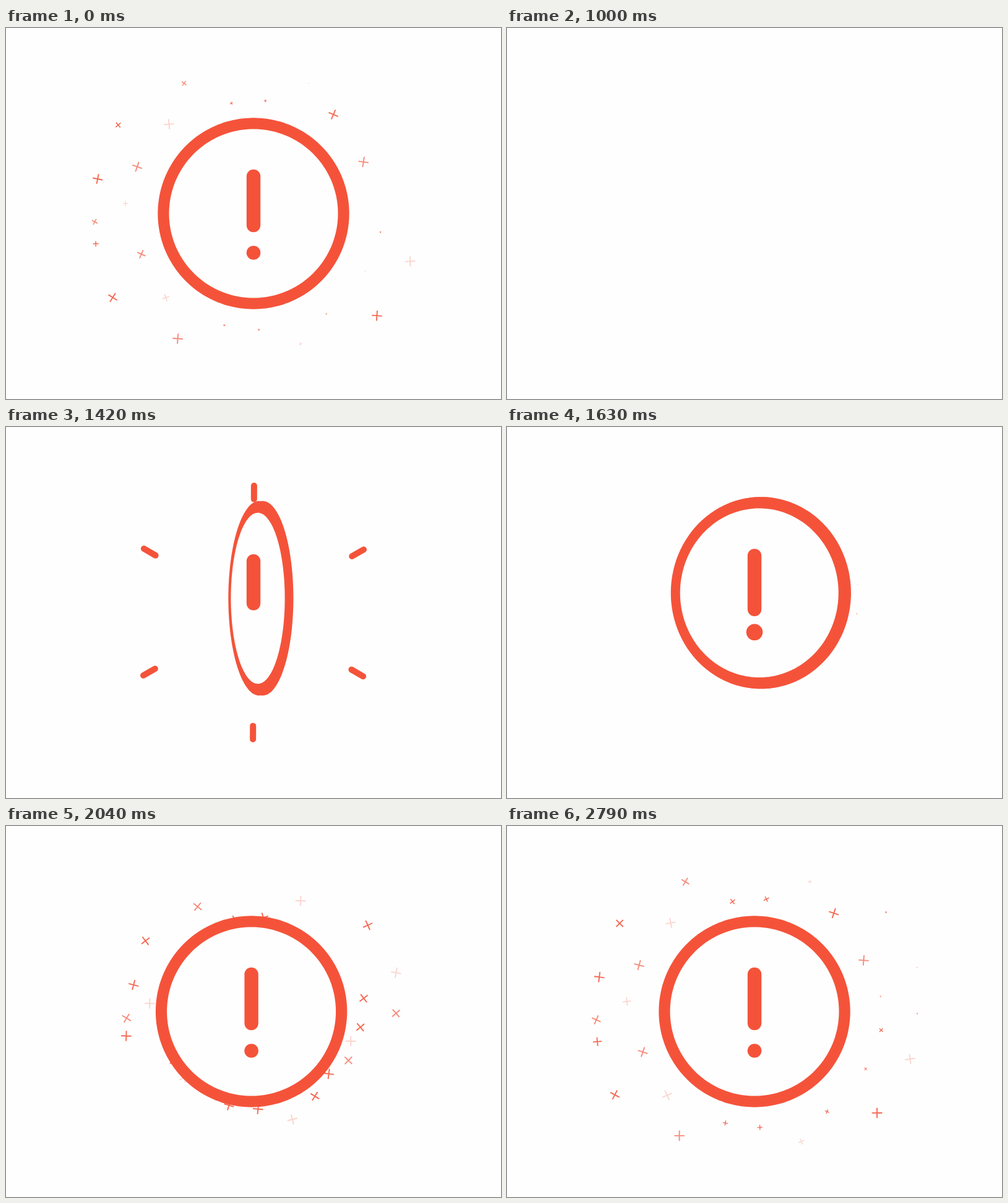
An HTML page with a canvas for the animation above (2830 ms loop, 800 by 600 pixels).

```html
<!DOCTYPE html>
<html lang="en">
<head>
<meta charset="utf-8">
<title>Alert badge</title>
<style>
  html, body { margin: 0; width: 100%; height: 100%; overflow: hidden; background: #fefefe; }
  canvas { display: block; width: 800px; height: 600px; }
</style>
</head>
<body>
<canvas id="stage" width="800" height="600"></canvas>
<script>
const ctx = document.getElementById('stage').getContext('2d');
const LOOP = 2830, RED = '#f4533a', PAPER = '#fefefe';
const CX = 400, CY = 300, RAD = Math.PI / 180;
const REST = 2790;   // time at which the crosses are at their base places
const COUNT = 29;

const clamp = v => Math.min(1, Math.max(0, v));
const part = (t, from, to) => clamp((t - from) / (to - from));
const easeInOut = p => (1 - Math.cos(Math.PI * p)) / 2;
const easeOut = (p, power) => 1 - Math.pow(1 - p, power);
const backOut = p => 1 + 3.4 * (p - 1) ** 3 + 2.4 * (p - 1) ** 2;
const rnd = n => {
  const v = Math.sin(n * 12.9898) * 43758.5453;
  return v - Math.floor(v);
};

// Crosses sit on two rings, closer together at the sides than at top and bottom
function makeCross(_, i) {
  const u = (i * 360 / COUNT - 185) * RAD;
  const a = u - 0.2 * Math.sin(2 * u);
  const pole = Math.sin(a) ** 6;
  const outer = (i % 2 === 0) !== (Math.cos(a) > 0);
  const r = 200 - 15 * pole + (outer ? 64 * (1 - 0.7 * pole) : 0) + 16 * (rnd(i) - 0.5);
  const late = i % 7 === 3 || i % 7 === 5;
  const pace = 0.05 - 0.01 * Math.cos(a) + 0.02 * rnd(i + 50) + (late ? 0.08 : 0);
  return {
    a, r, pace,
    end: Math.max(2810, 2820 + (pace - 0.045) * 4400),
    spin: 90 * rnd(i + 100),
    alpha: i % 4 === 1 ? 0.24 : i % 3 ? 0.88 : 0.68
  };
}
const crosses = Array.from({ length: COUNT }, makeCross);

// Slowing drift: 0 at rest time, 1 at 2380 ms
const decay = t => Math.exp((REST - t) / 420) - 1;

function drawCrosses(t) {
  if (t < 1625) return;
  const drift = decay(t) / decay(2380), grow = part(t, 1620, 1770);
  ctx.strokeStyle = RED;
  ctx.lineCap = 'butt';
  for (const c of crosses) {
    const size = 8.3 * grow * clamp((c.end - t) / 130);
    if (size < 0.3) continue;
    const r = c.r * (1 - c.pace * drift);
    ctx.save();
    ctx.globalAlpha = c.alpha;
    ctx.lineWidth = Math.min(1.9, 0.8 + size * 0.14);
    ctx.translate(CX + r * Math.cos(c.a), CY + r * Math.sin(c.a));
    ctx.rotate((c.spin + (t - REST) * 0.11) * RAD);
    ctx.beginPath();
    ctx.moveTo(-size, 0);
    ctx.lineTo(size, 0);
    ctx.moveTo(0, -size);
    ctx.lineTo(0, size);
    ctx.stroke();
    ctx.restore();
  }
}

function drawRays(t) {
  if (t < 1325 || t > 1562) return;
  const head = 150 + 81 * easeOut(part(t, 1320, 1510), 1.5);
  const tail = 150 + 81 * part(t, 1320, 1565);
  ctx.strokeStyle = RED;
  ctx.lineWidth = 10;
  ctx.lineCap = 'round';
  for (let i = 0; i < 6; i++) {
    const a = (i * 60 - 89.75) * RAD, c = Math.cos(a), s = Math.sin(a);
    ctx.beginPath();
    ctx.moveTo(CX + c * tail, CY + s * tail);
    ctx.lineTo(CX + c * head, CY + s * head);
    ctx.stroke();
  }
}

// Flies up from below, hangs at the top, then drops to the centre
function badgeY(t) {
  if (t < 1540) return 261 + 539 * Math.pow(part(t, 1540, 1040), 2.45);
  return 261 + 39 * easeInOut(part(t, 1540, 1860));
}

function shake(t) {
  const p = Math.max(0, t - 1880);
  return 10 * Math.exp(-p / 150) * Math.sin(p / 215 * Math.PI * 2);
}

function turn(t) {
  return 72.2 * RAD * Math.pow(Math.max(0, 1880 - t) / 460, 2.02);
}

// A disc turned about its vertical axis, seen in perspective
function disc(x, y, r, angle, color) {
  const depth = 805, n = 180, c = Math.cos(angle), s = Math.sin(angle);
  ctx.beginPath();
  for (let i = 0; i < n; i++) {
    const a = i / n * Math.PI * 2, u = r * Math.cos(a);
    const k = depth / (depth - u * s);
    ctx.lineTo(x + u * c * k, y + r * Math.sin(a) * k);
  }
  ctx.closePath();
  ctx.fillStyle = color;
  ctx.fill();
}

function drawBadge(t) {
  const x = CX + shake(t), y = badgeY(t), angle = turn(t);
  const rim = 6.2 * Math.sin(angle) ** 2;
  if (rim > 0.1) disc(x + rim, y, 154.7, angle, RED);
  disc(x, y, 154.7, angle, RED);
  disc(x, y, 136.5, angle, PAPER);

  ctx.fillStyle = RED;
  if (t > 1330) {
    const length = 22.4 + 79 * backOut(part(t, 1330, 1730));
    ctx.beginPath();
    ctx.roundRect(x - 11.2, y - 71.2, 22.4, Math.max(22.4, length), 11.2);
    ctx.fill();
  }
  if (t > 1500) {
    const r = 11.3 * Math.max(0, backOut(part(t, 1500, 1760)));
    ctx.beginPath();
    ctx.arc(x, y + 63.5, r, 0, Math.PI * 2);
    ctx.fill();
  }
}

function draw(ms) {
  const now = ms % LOOP;
  const t = now < 1000 ? now + LOOP : now;   // the tail of the scene runs over the loop point
  ctx.fillStyle = PAPER;
  ctx.fillRect(0, 0, 800, 600);
  if (t < 1078) return;
  drawCrosses(t);
  drawRays(t);
  drawBadge(t);
}

const start = performance.now();
function tick() {
  draw(performance.now() - start);
  requestAnimationFrame(tick);
}
tick();
</script>
</body>
</html>
```
